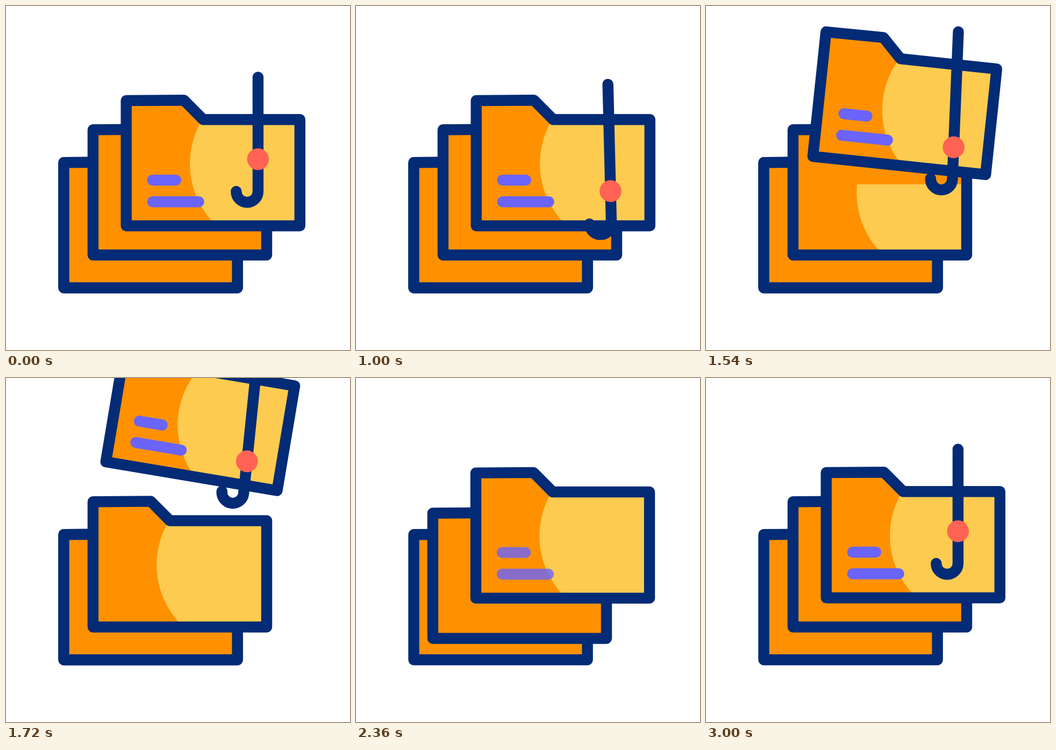
An HTML page with a canvas that plays this animation: 640 px wide and 640 px high, repeating every 3020 ms.

```html
<!DOCTYPE html>
<html>
<head>
<meta charset="utf-8">
<style>
html, body { margin: 0; width: 100%; height: 100%; overflow: hidden; background: #fff; }
canvas { display: block; width: 640px; height: 640px; }
</style>
</head>
<body>
<canvas id="stage" width="640" height="640"></canvas>
<script>
const ctx = document.getElementById('stage').getContext('2d');
const NAVY = '#032b76', ORANGE = '#ff9100', YELLOW = '#fdcb50', PURPLE = '#6b64fb', RED = '#ff6354';
const LOOP = 3020, LINE = 20.4, LIFT = 520;
const MIDDLE = [-61.8, 54.2], BACK = [-116.2, 115.2];
const outline = new Path2D('M223.7 176 L331 175.2 L366.8 211.3 H546.8 V409 H223.7 Z');

const ramp = (t, from, to) => Math.min(1, Math.max(0, (t - from) / (to - from)));
const ease = (t, from, to) => { const u = ramp(t, from, to); return u * u * (3 - 2 * u); };
const mix = (a, b, u) => a + (b - a) * u;

function turn(degrees, x, y) {
  ctx.translate(x, y);
  ctx.rotate(degrees * Math.PI / 180);
  ctx.translate(-x, -y);
}

function dot(x, y, r, color) {
  ctx.fillStyle = color;
  ctx.beginPath();
  ctx.arc(x, y, r, 0, 7);
  ctx.fill();
}

function bar(x1, x2, y) {
  ctx.beginPath();
  ctx.moveTo(x1, y);
  ctx.lineTo(x2, y);
  ctx.stroke();
}

// glowTop: height down to which the yellow part is shown; labels: opacity of the bars
function folder(x, y, glowTop = 640, labels = 0) {
  ctx.save();
  ctx.translate(x, y);
  ctx.fillStyle = ORANGE;
  ctx.fill(outline);

  ctx.save();
  ctx.clip(outline);
  ctx.beginPath();
  ctx.rect(0, glowTop, 640, 640);
  ctx.clip();
  dot(501, 293.5, 159, YELLOW);
  ctx.restore();

  ctx.globalAlpha = labels;
  ctx.strokeStyle = PURPLE;
  bar(272.7, 315.8, 324);
  bar(272.7, 358.6, 364.3);

  ctx.globalAlpha = 1;
  ctx.strokeStyle = NAVY;
  ctx.stroke(outline);
  ctx.restore();
}

function hook(angle, drop) {
  ctx.save();
  turn(angle, 469, 155);
  ctx.strokeStyle = NAVY;
  ctx.beginPath();
  ctx.moveTo(468.9, 132.5 + drop * 0.22);
  ctx.lineTo(468.9, 345 + drop);
  ctx.arc(448.6, 345 + drop, 20.3, 0, Math.PI);
  ctx.stroke();
  dot(468.8, 285 + drop, 20.3, RED);
  ctx.restore();
}

function draw(t) {
  ctx.clearRect(0, 0, 640, 640);
  ctx.lineWidth = LINE;
  ctx.lineCap = ctx.lineJoin = 'round';

  // the pile moves up one place
  const u = ease(t, 2000, 2600), v = 1 - ease(t, 1800, 2400);
  folder(...BACK);
  folder(mix(BACK[0], MIDDLE[0], u), mix(BACK[1], MIDDLE[1], u));
  folder(MIDDLE[0] * v, MIDDLE[1] * v,
    mix(416, 186, ease(t, 1200, 1800)), ramp(t, 2200, 2400));

  // the hook dips, then pulls the front folder out
  const leaving = t < 2400;
  const lift = LIFT * (leaving ? ease(t, 1200, 2400) : 1 - ease(t, 2600, 3000));
  const tilt = 10 * (ease(t, 1200, 1800) - ease(t, 1800, 2400));
  const swing = 5.2 * ease(t, 0, 600) - 8.9 * ease(t, 600, 1200);

  ctx.save();
  ctx.translate(0, -lift);
  turn(tilt, 469, 159);
  if (leaving) {
    folder(0, 0, 0, 1);
    hook(swing, 80 * ease(t, 600, 1200));
  } else {
    hook(0, 0);
  }
  ctx.restore();
}

const start = performance.now();
function tick() {
  draw((performance.now() - start) % LOOP);
  requestAnimationFrame(tick);
}
tick();
</script>
</body>
</html>
```
